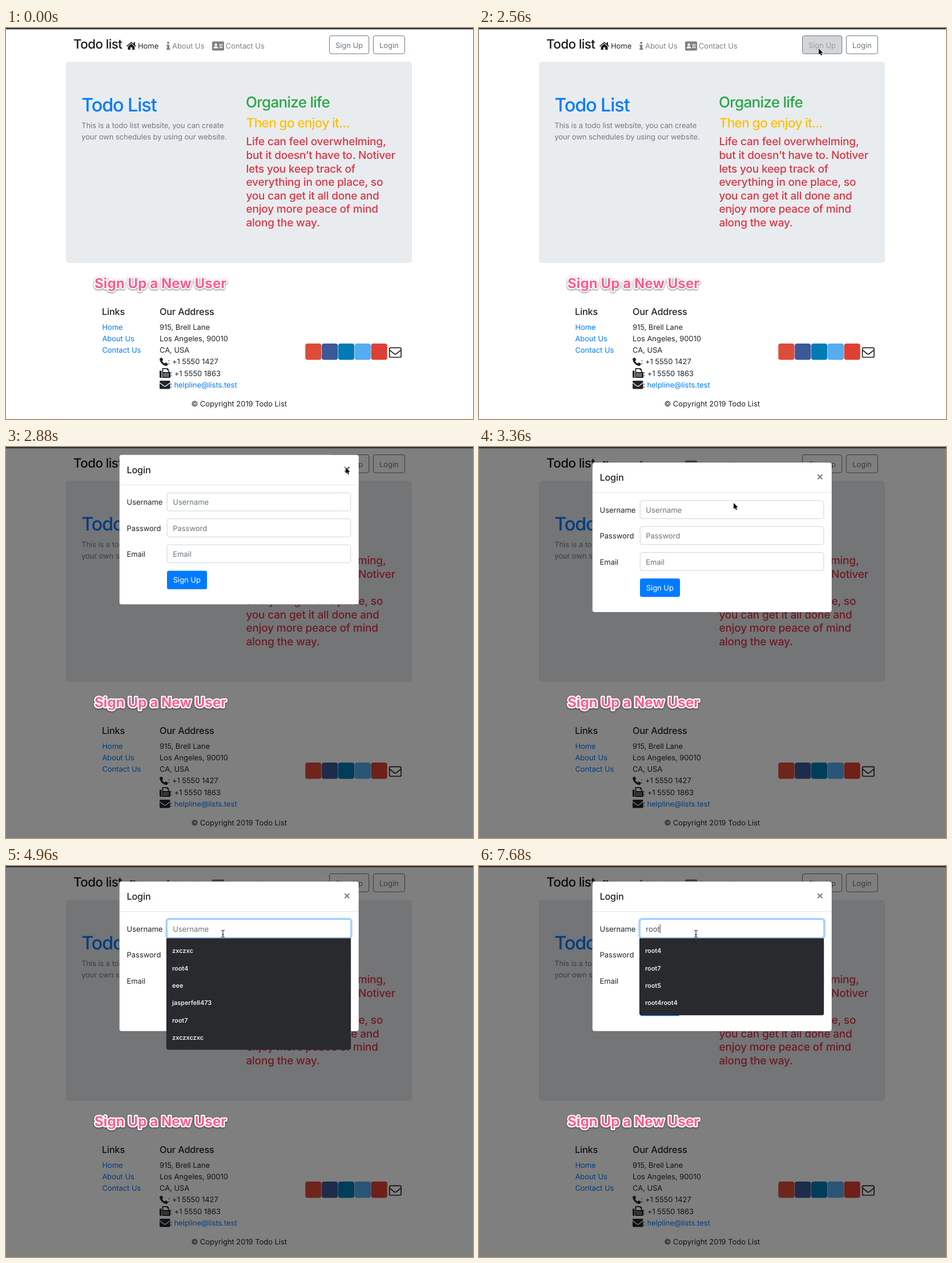
Write an HTML page that moves like this. It is 818 by 684 pixels and loops after 8 s.

```html
<!DOCTYPE html>
<html lang="en">
<head>
<meta charset="utf-8">
<title>Todo list</title>
<style>
  html, body { margin: 0; width: 100%; height: 100%; overflow: hidden; background: #fff; }
  svg { display: block; width: 100vw; height: 100vh; }
  text {
    font: 400 13px Inter, sans-serif; font-optical-sizing: none;
    letter-spacing: -.004em; fill: #212529; white-space: pre;
  }
  .mid { text-anchor: middle; }
  .brand { font-size: 22.4px; font-weight: 500; letter-spacing: -.027em; fill: #1a1a1a; }
  .off { fill: #808080; }
  .h1 { font-size: 32.4px; font-weight: 500; letter-spacing: -.034em; fill: #007bff; }
  .h2 { font-size: 26.1px; font-weight: 500; letter-spacing: -.029em; fill: #28a745; }
  .h3 { font-size: 22.8px; font-weight: 500; letter-spacing: -.033em; fill: #ffc107; }
  .h4 { font-size: 19.05px; font-weight: 500; letter-spacing: -.01em; fill: #dc3545; }
  .h5 { font-size: 16.3px; font-weight: 500; letter-spacing: -.01em; }
  .muted { fill: #6c757d; }
  .lead { letter-spacing: -.007em; fill: #737b83; }
  .link { fill: #007bff; }
  .note {
    font-size: 24px; font-weight: 700; letter-spacing: .004em; fill: #fb5d90;
    stroke: #fff; stroke-width: 4.5px; stroke-linejoin: round; paint-order: stroke;
    filter: drop-shadow(0 1px 1.5px rgba(0, 0, 0, .55));
  }
  .box { fill: #fff; stroke: #ced4da; }
  .btn { fill: none; stroke: #6c757d; }
  .item { font-size: 11px; font-weight: 600; letter-spacing: -.005em; fill: #e8eaed; }
</style>
</head>
<body>
<svg viewBox="0 0 818 684" text-rendering="geometricPrecision">
  <rect width="818" height="684" fill="#fff"/>

  <!-- navigation -->
  <text class="brand" x="118" y="36.3">Todo list</text>
  <path d="M211 31.6 219.5 24.2 223.6 27.7V25H226V29.8L228 31.6 227 32.8 219.5 26.3 212 32.8ZM213.6 32.7 219.5 27.6 225.4 32.7V38H221.2V33.8H217.8V38H213.6Z" fill="#1a1a1a"/>
  <text x="231" y="36">Home</text>
  <path d="M282.3 24.2h3.6v3.4h-3.6ZM281.2 29.2h5v6.6h1.4V38h-6.6v-2.2h1.3v-4.4h-1.1Z" fill="#808080"/>
  <text class="off" x="291" y="36">About Us</text>
  <g fill="#808080">
    <rect x="361" y="23.5" width="21" height="16" rx="1.8"/>
    <g fill="#fff">
      <circle cx="367.5" cy="29.3" r="2.2"/>
      <path d="M363.6 35.5q0-3.2 2.6-3.2h2.6q2.6 0 2.6 3.2ZM373.5 28h6v1.3h-6ZM373.5 30.8h6v1.3h-6ZM373.5 33.6h6v1.3h-6Z"/>
    </g>
  </g>
  <text class="off" x="384.8" y="36">Contact Us</text>
  <rect id="join" class="btn" x="566.5" y="13.6" width="69.2" height="31.5" rx="3.4"/>
  <text id="joinText" class="mid muted" x="601" y="34.6">Sign Up</text>
  <rect class="btn" x="643.4" y="13.6" width="55" height="31.5" rx="3.4"/>
  <text class="mid muted" x="670.8" y="34.6">Login</text>

  <!-- hero panel -->
  <rect x="105" y="59" width="606" height="352" rx="5" fill="#e9ecef"/>
  <text class="h1" x="132.2" y="146">Todo List</text>
  <text class="lead" x="132.2" y="175">This is a todo list website, you can create</text>
  <text class="lead" x="132.2" y="195.2">your own schedules by using our website.</text>
  <text class="h2" x="420" y="139">Organize life</text>
  <text class="h3" x="420.5" y="174">Then go enjoy it...</text>
  <g id="pitch"></g>

  <!-- footer -->
  <text class="h5" x="168" y="501.5">Links</text>
  <text class="link" x="168.4" y="527.8">Home</text>
  <text class="link" x="168.4" y="548">About Us</text>
  <text class="link" x="168.4" y="568.2">Contact Us</text>
  <text class="h5" x="268.9" y="501.5">Our Address</text>
  <text x="269" y="527.8">915, Brell Lane</text>
  <text x="269" y="548">Los Angeles, 90010</text>
  <text x="269" y="568.2">CA, USA</text>
  <text x="283.6" y="588.4">: +1 5550 1427</text>
  <text x="287.4" y="608.6">: +1 5550 1863</text>
  <text x="287.4" y="628.8">:</text>
  <text class="link" x="294.4" y="628.8">helpline@lists.test</text>
  <g fill="#212529">
    <path d="M269.4 578.3 272.6 576.2 275.4 580.6 273.4 582.6Q274.8 585.6 277.8 587L279.8 585 284 587.6 282.4 590.4Q280.8 591.6 277.6 590.4 271.8 587.8 269.6 582Q268.8 579.6 269.4 578.3Z"/>
    <path d="M269 599.5h3.6v12.5H270.4q-1.4 0-1.4-1.4Z"/>
    <path d="M273.6 595h9.2l2.6 2.6v4h1.4q1.2 0 1.2 1.2v8q0 1.2-1.2 1.2H273.6Z"/>
    <path d="M275.4 596.8h6.4v2h2v3.2h-8.4ZM275.8 604.4h2v1.8h-2ZM279.2 604.4h2v1.8h-2ZM282.6 604.4h2v1.8h-2ZM275.8 607.8h2v1.8h-2ZM279.2 607.8h2v1.8h-2ZM282.6 607.8h2v1.8h-2Z" fill="#fff"/>
    <rect x="269" y="617" width="18.6" height="14.5" rx="1.8"/>
    <path d="M269 620.6 276.6 626.2Q278.3 627.4 280 626.2L287.6 620.6" fill="none" stroke="#fff" stroke-width="1.2"/>
  </g>
  <g id="social"></g>
  <g fill="none" stroke="#212529" stroke-width="1.7" stroke-linejoin="round">
    <rect x="671.6" y="559.4" width="20.4" height="16.6" rx="2"/>
    <path d="M671.8 563.4 680 570Q681.8 571.2 683.6 570L691.8 563.4"/>
  </g>
  <text class="mid" x="408.2" y="662.3">© Copyright 2019 Todo List</text>

  <rect id="dim" y="2" width="818" height="682"/>
  <rect width="818" height="2.3" fill="#303033"/>
  <text class="note" x="155" y="454.6">Sign Up a New User</text>

  <!-- dialog -->
  <g id="modal">
    <rect x="198.5" y="27" width="419.5" height="262" rx="4" fill="#fff" stroke="#000" stroke-opacity=".2"/>
    <text class="h5" x="211.4" y="59.3">Login</text>
    <path id="close" d="M593.3 48.3 601.3 56.3M601.3 48.3 593.3 56.3" stroke="#000" stroke-width="2.1"/>
    <path d="M199 79.5H617.5" stroke="#e3e6e9"/>
    <rect id="ring" x="280.6" y="92.1" width="324.8" height="34.8" rx="4.6" fill="none" stroke="#007bff" stroke-opacity=".32" stroke-width="2.7"/>
    <g id="fields"></g>
    <rect x="282" y="230" width="70" height="32.2" rx="3.4" fill="#007bff"/>
    <text class="mid" x="316.8" y="250.8" style="fill:#fff">Sign Up</text>
  </g>
  <path id="caret" d="M0 102V117.5" stroke="#333"/>
  <g id="menu">
    <path id="menuBox" fill="#292a2d" style="filter:drop-shadow(0 .5px 1px rgba(0,0,0,.25))"/>
    <g id="items"></g>
  </g>

  <path id="arrow" d="M0 0V10.4L2.4 8.2 4.1 12 5.9 11.2 4.3 7.5H7.6Z" stroke="#fff" stroke-width="1.3" paint-order="stroke"/>
  <path id="beam" d="M-3-6.2Q-.4-6.2 0-4.8 .4-6.2 3-6.2M0-5V5M-3 6.2Q-.4 6.2 0 4.8 .4 6.2 3 6.2M-1.5 1.6H1.5" fill="none" stroke="#222" stroke-width="1.1"/>
</svg>
<script>
  const LOOP = 8000, TICK = 160;
  const $ = id => document.getElementById(id);
  const show = (id, on) => $(id).style.display = on ? '' : 'none';
  const lines = (list, cls, x, y, step) => list.map((s, i) =>
    `<text class="${cls}" x="${x}" y="${y + i * step}">${s}</text>`).join('');

  $('pitch').innerHTML = lines([
    'Life can feel overwhelming,', 'but it doesn’t have to. Notiver', 'lets you keep track of',
    'everything in one place, so', 'you can get it all done and',
    'enjoy more peace of mind', 'along the way.'
  ], 'h4', 420.4, 205.4, 23.58);

  $('social').innerHTML = ['#dd4b39', '#3b5998', '#007bb5', '#55acee', '#dd4033'].map((c, i) =>
    `<rect x="${524.3 + i * 28.8}" y="552" width="28.2" height="28.5" rx="4" fill="${c}"/>`).join('');

  $('fields').innerHTML = ['Username', 'Password', 'Email'].map((s, i) => {
    const y = 93.7 + i * 45.4;
    return `<text x="211.6" y="${y + 21}">${s}</text>
      <rect class="box" x="282.2" y="${y}" width="321.6" height="31.6" rx="3.4"/>
      <text class="muted" x="292.3" y="${y + 21}">${s}</text>`;
  }).join('');
  const userBox = $('fields').querySelector('rect');
  const userText = $('fields').querySelectorAll('text')[1];

  const recent = ['zxczxc', 'root4', 'eee', 'jasperfell473', 'root7', 'zxczxczxc'];
  const matches = ['root4', 'root7', 'root5', 'root4root4'];

  // time, x, y of the pointer
  const track = [
    [320, 424, 160], [480, 438, 146], [640, 470, 116], [800, 510, 82], [960, 545, 54],
    [1120, 568, 36], [1280, 574, 27], [1440, 570, 16], [1760, 588, 30], [2080, 595, 36],
    [3200, 560, 52], [3360, 446, 98], [3520, 380, 118.5]
  ];
  const typing = [[5440, 'r'], [5600, 'roo'], [5760, 'root']];
  const last = (keys, t) => keys.filter(k => k[0] <= t).pop();
  const mix = (a, b, k) => `rgb(${a.map((v, i) => v + (b[i] - v) * k)})`;
  const grey = [108, 117, 125], white = [255, 255, 255];

  function pointer(t) {
    const key = last(track, t), inField = t >= 3520;
    show('arrow', key && !inField);
    show('beam', inField);
    if (key) $(inField ? 'beam' : 'arrow').setAttribute('transform', `translate(${key[1]} ${key[2]})`);
  }

  function signUpButton(t) {
    const fill = t < 2080 || t >= 2720 ? 0 : t < 2240 ? .6 : t < 2560 ? 1 : .3;
    $('join').style.fill = mix(white, grey, fill);
    $('join').style.fillOpacity = fill ? 1 : 0;
    $('joinText').style.fill = mix(grey, white, fill);
  }

  function dialog(t) {
    $('dim').style.opacity = t < 2720 ? 0 : t < 2880 ? .44 : .5;
    show('modal', t >= 2880);
    $('modal').setAttribute('transform', `translate(0 ${t < 3040 ? -13.4 : 0})`);
    $('close').style.opacity = t < 3200 ? .75 : .5;
  }

  function userField(t) {
    const focus = t >= 3520, typed = last(typing, t);
    show('ring', focus);
    userBox.style.stroke = focus ? '#80bdff' : '';
    userText.textContent = typed ? typed[1] : 'Username';
    userText.style.fill = typed ? '#495057' : '';

    const since = t < 5440 ? 3520 : Math.min(t, 5760);
    show('caret', focus && Math.floor((t - since) / 480) % 2 === 0);
    const x = typed ? 292.8 + userText.getComputedTextLength() : 293.5;
    $('caret').setAttribute('transform', `translate(${x} 0)`);

    show('menu', t >= 3680);
    const list = typed ? matches : recent, bottom = typed ? 261 : 321.3;
    $('menuBox').setAttribute('d', `M281 126.5H604V${bottom - 3}q0 3-3 3H284q-3 0-3-3Z`);
    $('items').innerHTML = lines(list, 'item', 291, 152.3, 30.3);
  }

  let shown = -1;
  function draw(now) {
    const t = Math.floor(now % LOOP / TICK) * TICK;
    if (t !== shown) {
      shown = t;
      [pointer, signUpButton, dialog, userField].forEach(part => part(t));
    }
    requestAnimationFrame(() => draw(performance.now() - start));
  }
  const start = performance.now();
  draw(0);
</script>
</body>
</html>
```
